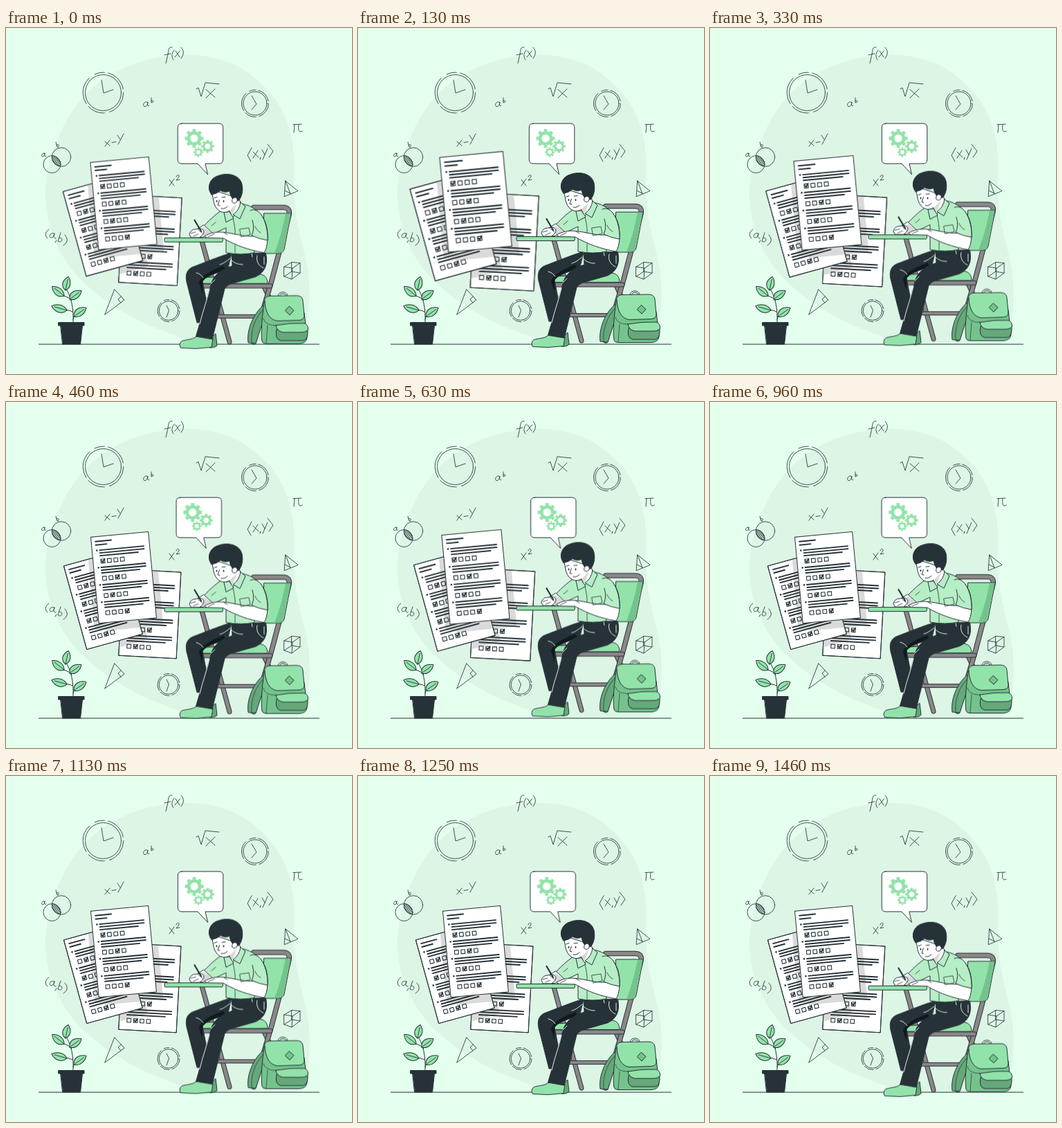
Recreate the animation shown at these times as an HTML page. Size 500 px wide and 500 px high, loop 1500 ms.

```html
<!DOCTYPE html>
<html lang="en">
<head>
<meta charset="utf-8">
<title>Exam study</title>
<style>
html, body { margin: 0; width: 100%; height: 100%; overflow: hidden; background: #e4ffed; }
svg { display: block; width: 100vw; height: 100vh; fill: none; stroke: #263238; stroke-width: 1; stroke-linecap: round; stroke-linejoin: round; }
.g { fill: #92e3a9; }
.m { fill: #75c38c; }
.d { fill: #65a87a; }
.s { fill: #b6eec6; }
.w { fill: #fff; }
.k { fill: #263238; }
.n { stroke: none; }
.wh { stroke: #fff; stroke-width: .9; }
#clocks, #maths { stroke-width: .85; }
</style>
</head>
<body>
<svg viewBox="0 0 500 500">
  <path class="n" fill="#dcf5e5" d="M57 240C57 205 72 150 105 108C140 64 195 42 250 39C315 36 360 62 390 105C412 136 418 175 416 215C415 260 422 290 431 325C440 360 441 400 434 430C430 445 425 453 420 457H285C266 452 248 446 228 438C186 422 138 396 103 358C74 325 57 285 57 240Z"/>
  <path d="M47.500 457H452.500"/>

  <g id="clocks"></g>

  <g id="maths">
    <path d="M240 28C235 26 235 32 234 38L231 51M229 39L238 37M243 32C239 37 239 42 242 46M245 33L251 42M251.500 33L244 42M253 28C258 33 257 39 253 44"/>
    <path d="M275 88L278 86.500L282 99L288 79L308 81M289 89L302 100M302 88L289 101"/>
    <path d="M204 107C199 106 197 112 200 113.500C203 114 205 110 205 107C204 112 205 114 207 112M210 101V108C213 108 215 104 210 105"/>
    <path d="M415 139.500L427 139M417 139.500L416 151M423 139.500C422 148 423 152 428 149"/>
    <path d="M355 173L349 184L354 193M357 179L365 187M364 177L357 188M368 187L367 190M370 176L374 183M378 174L371 190M378 168L386 178L380 187"/>
    <path d="M143 164L150 170M150 162L143 171M153 165.500L159 164.500M161 155L165 161M170 153L162 168"/>
    <path d="M236 219L243 228M243 218L236 228M246 215C247 211 251 212 250 215C249 217 247 218 246 220L251 219"/>
    <path d="M62 291C56 295 56 301 60 304M70 297C64 295 61 301 65 303C68 303 70 299 70 297C68 302 69 304 72 304M73 307L71 310M79 296L75 308C81 312 84 303 77 303M85 299C91 306 88 311 83 314"/>
    <path d="M56 181C52 180 50 185 53 186C55 186 56 183 56 181C55 185 56 186 58 185M72 165L74 172C78 172 77 167 73 169"/>
    <circle cx="66.500" cy="197" r="12.500"/>
    <circle cx="80" cy="186.500" r="13.700"/>
    <path fill="#b9cfc2" d="M66.500 184.500C74 185 79 191 79 199C71 199 66 193 66.500 184.500Z"/>
    <path d="M67 186L76 199M69 185.500L78 197M72 186.500L78 194M67 190L73 198"/>
    <path d="M157 378L171 393L143 414ZM166 397L162 392L166.500 388"/>
    <path d="M404 221L422 235.500L402.500 243.500ZM404 221L411 239.500M403 235L411 239"/>
    <path d="M402 345L414 347L413 363L402 359ZM413 338.500L425 339.500V354L413 352ZM402 345L413 338.500M414 347L425 339.500M413 363L425 354M402 359L413 352"/>
  </g>

  <g id="plant">
    <path d="M97 425C98 405 94 388 87 377M95 394C93 391 88 388 83 387M96 410C92 408 90 408 86 407M97 421Q97 417 100 416"/>
    <g id="leaves"></g>
    <path class="k" d="M76 425.500H113V430H76ZM79 430H110.500L107.500 457H82Z"/>
  </g>

  <g id="papers"></g>

  <g id="bubble">
    <path class="w" d="M254 138H308Q313.800 138 313.800 144V190Q313.800 196 308 196H288L291.500 211.500L277 196H254Q248.300 196 248.300 190V144Q248.300 138 254 138Z"/>
    <g id="gears" stroke="#92e3a9" stroke-linecap="butt"></g>
  </g>

  <g id="student">
    <g id="frame"></g>
    <path class="g" d="M373 268H412L402 320Q400 326 394 326H372Z"/>
    <path class="m n" d="M404 268.500H411.500L401.500 319Q400 325.500 393 325.500H388Q398 300 404 268.500Z"/>
    <path class="g" d="M278 369Q278 363 286 361L368 356Q378 358 378 369Z"/>
    <g id="seat"></g>

    <g id="bag">
      <path d="M393 388C393 380 406 380 407 387M395 388C396 383 403 383 405 387"/>
      <path class="d" d="M374 400C362 407 347 432 350 455L361 456C366 440 371 426 375 412Z"/>
      <path d="M372 407C361 417 353 437 355 455" stroke-width=".7"/>
      <path class="m" d="M373 396C370 420 368 440 370 453Q371 456.500 376 456.500H424Q434 456 435 448L431 412Z"/>
      <path class="g" d="M374 396Q372 388 382 387.500L420 387Q428 387 429 394L431 416Q431 422 424 422.500L392 423.500C380 422 375 410 374 396Z"/>
      <path class="m" d="M409.500 402.500L416 408.500L410 415L403.500 409Z"/>
      <path class="d" d="M391 436Q388 450 397 452H430Q437 450 436 436Z"/>
      <path class="g" d="M390 430Q411 426 431 427Q437 429 436.500 436Q434 440 426 440H400Q391 438 390 430Z"/>
      <path d="M372 420C374 428 382 430 390 430M378 430L376 456" stroke-width=".7"/>
    </g>

    <path class="d" d="M294 449L303 442L305 459Q301 463 294 462Z"/>
    <path class="g" d="M275 446C270 451 261 450 254 452.500Q249 457 252.500 462.500Q275 465 297 461.500L299 449Z"/>
    <path class="k" d="M326 325C306 331 285 340 270 345.500C259 350 259 361 262 371L276 426L284 426L289 392L284 366Q290 357 320 350Z"/>
    <path class="n" fill="#10191d" d="M314 344C299 350 284 356 279 368L284 384V366Q292 356 318 350Z"/>
    <path class="k" d="M326 325L327 344C309 350 299 358 296 372L274.500 446L298 450L316 377Q320 370 332 368L360 360C374 354 379 342 375.500 326Z"/>
    <path class="wh" d="M294 378C290 396 284 410 280 428M275 354C279 355 282 357 285 361M296 370L302 364M324 333C319 337 314 341 309 342M326 336C330 340 336 342 342 342M363 329C361 337 365 344 372 347M355 326L356 331M373 331V342"/>

    <path class="s" d="M317 261C306 266 296 276 286 286L299 298L318 289V325Q340 329 359 325L360 300L378 306C379 286 373 271 361 263Q352 256 340 254Z"/>
    <path class="w" d="M286 285L299 297L282 303L275 292Z"/>
    <path class="n" fill="#d7d9d8" d="M286 288L299 297L286 302L280 294Z"/>
    <path class="g" d="M229 304Q229 303.500 230 303.500H312Q313.500 303.500 313.500 306.500Q313.500 309.500 312 309.500H230Q229 309.500 229 308Z"/>
    <path class="w" d="M265 298Q267 291 274 291L282 290Q288 293 285 298L280 303H268Z"/>
    <path d="M272.500 278L282 294" stroke-width="2.200"/>
    <path d="M267 297L274 295M271 301L278 298M278 292L284 297" stroke-width=".8"/>
    <path class="w" d="M287 301C293 297 304 294 315 295.500C330 297 344 302 357 301L378 306Q377 319 373 325C351 321 333 315 314 304L291 303.500Z"/>
    <path d="M292 302L301 298M315 296L320 299" stroke-width=".8"/>
    <path class="s" d="M353 264C366 257 379 281 378 307Q365 305 355 300Q360 290 356 278"/>
    <path d="M327 271Q332 291 331 298M331 314V325M338 291L351 289L353 299L340 302ZM303 281L297 286M360 287Q363 294 368 296" stroke-width=".8"/>

    <path class="w" d="M297 234L299.500 248Q301 260 309 265Q318 269 323 264L327 274L341 260L337 247Z"/>
    <path class="n" fill="#d7d9d8" d="M323 264L334 254L327 271Z"/>
    <path class="s" d="M323 266L329 275L318 281L315 267ZM339 252L346 258L338 276L328 270Q337 264 339 252Z"/>
    <path class="k" d="M297 241C289 231 295 217 306 214C321 208 338 213 341 226C343 236 341 244 336 250L328 248Q324 243 323 236Q316 239 310 235Q305 240 297 241Z"/>
    <path class="w" d="M327 248C330 242 337 247 333 252Q330 255 327 252Z"/>
    <path d="M301 246L305 244.500M312 245L317 244.500M308.500 249L306 256L309 257M311 261Q316 262.500 320 258"/>
    <path d="M304.500 250V251M314.500 250V251" stroke-width="1.800"/>
  </g>
</svg>
<script>
const $ = id => document.getElementById(id);
const fill = (id, parts) => $(id).innerHTML = parts.join('');

const clock = (x, y, r, R, hands) => `
  <circle cx="${x}" cy="${y}" r="${r}"/>
  <circle cx="${x}" cy="${y}" r="${R}" pathLength="100" stroke-dasharray="20 4 14 3 22 5 8 3 18 3"/>
  <path d="${hands}"/>`;
fill('clocks', [
  clock(140.5, 93.5, 26, 29.3, 'M138 75L141 94L155 89'),
  clock(360, 109, 17, 19.5, 'M355 98L362 110L355 118'),
  clock(235, 408.5, 13.8, 16, 'M232 401L235.500 408L232 418')
]);

const leaf = (x, y, angle, len) => `
  <g transform="translate(${x} ${y}) rotate(${angle})">
    <path class="g" d="M0 0C${len * .25} -9 ${len * .7} -7 ${len} 0C${len * .7} 6 ${len * .25} 7 0 0Z"/>
    <path d="M0 0H${len * .8}" stroke-width=".8"/>
  </g>`;
fill('leaves', [
  leaf(86, 379, -78, 20), leaf(92, 392, -36, 21), leaf(84, 387, 218, 22),
  leaf(88, 408, 196, 23), leaf(98, 417, -35, 22)
]);

// Eight teeth, the first one centred on the x axis
const gear = (x, y, r) => `
  <g transform="translate(${x} ${y}) rotate(-11.250)">
    <circle r="${r * .6}" stroke-width="${r * .36}"/>
    <circle r="${r * .87}" stroke-width="${r * .26}" pathLength="80" stroke-dasharray="5 5"/>
  </g>`;
fill('gears', [gear(272, 159.5, 13.5), gear(291.5, 171, 9.5), gear(278, 179.5, 7)]);

const tube = (d, w = 7) =>
  `<path d="${d}" stroke-width="${w}"/><path d="${d}" stroke="#8c8789" stroke-width="${w - 2}"/>`;
fill('frame', [
  tube('M283 308L323 454'), tube('M372 372L390 410'),
  tube('M306 417H370', 6),
  tube('M358 259.500H400Q411 259.500 409 270L384 365L358 454', 7.5)
]);
fill('seat', [tube('M284 373H382')]);

// Sheets: position, tilt, ticked box of each question
const W = 83.5, H = 125;
const bar = (x, y, w) => `<path d="M${x} ${y}h${w}" stroke-width="1.900"/>`;
const box = (x, y, ticked) => `
  <rect x="${x - 2.8}" y="${y - 2.8}" width="5.600" height="5.600" stroke-width="1.100"/>
  ${ticked ? `<path d="M${x - 1.7} ${y - .5}l1.500 2l3 -4.500" stroke-width="1.800"/>` : ''}`;
const question = (tick, i) => {
  const y = 20 + 25 * i;
  return `<circle class="k n" cx="7" cy="${y}" r="1.300"/>` +
    [64, 64, 55].map((w, n) => bar(11, y + 4 * n, w)).join('') +
    [0, 1, 2, 3].map(n => box(14.2 + 9.4 * n, y + 16, n === tick)).join('');
};
const place = ([x, y, a], dx = 0, dy = 0) => `transform="translate(${x + dx} ${y + dy}) rotate(${a})"`;
const rect = `width="${W}" height="${H}"`;
const sheet = pos => `<rect class="w" ${rect} ${place(pos)}/>`;
const content = (pos, ticks) =>
  `<g ${place(pos)}>${bar(6, 7, 23)}${bar(6, 12, 16)}${ticks.map(question).join('')}</g>`;
const outline = pos => `<rect ${rect} ${place(pos)}/>`;
const clip = (id, pos) => `<clipPath id="${id}"><rect ${rect} ${place(pos)}/></clipPath>`;
const shade = (id, pos, dx, dy) =>
  `<g clip-path="url(#${id})"><rect class="n" fill="#d9dad9" ${rect} ${place(pos, dx, dy)}/></g>`;

const right = [169.5, 241.5, 3.1], left = [83.5, 237, -15.4], front = [122.5, 195.3, -5.4];
fill('papers', [
  clip('r', right), clip('l', left),
  sheet(right), shade('r', front, 10, 11), shade('r', left, 8, 8),
  content(right, [1, 2, 3, 1]), outline(right),
  sheet(left), shade('l', front, -6, 9), shade('l', front, 9, 11),
  content(left, [1, 0, 0, 2]), outline(left),
  sheet(front), content(front, [0, 2, 1, 3])
]);

// Steps are [offset, value]
const loop = (id, css, steps) => $(id).animate(
  steps.map(([offset, v]) => ({ offset, transform: css(v) })),
  { duration: 1500, delay: -20, iterations: Infinity });

$('papers').style.transformOrigin = '168.5px 279px';
loop('papers', v => `scale(${v})`,
  [[0, 1], [.1, 1.1], [.3, 1], [.4, 1], [.5, 1.1], [.6, 1], [1, 1]]);
loop('bubble', v => `translateX(${v}px)`,
  [[0, 0], [.1, -1], [.2, 2], [.3, -4], [.4, 4], [.5, -4], [.6, 4], [.7, -4], [.8, 2], [.9, -1], [1, 0]]);
loop('student', v => `translateY(${v}px)`, [[0, 0], [.5, -10], [1, 0]]);
</script>
</body>
</html>
```
